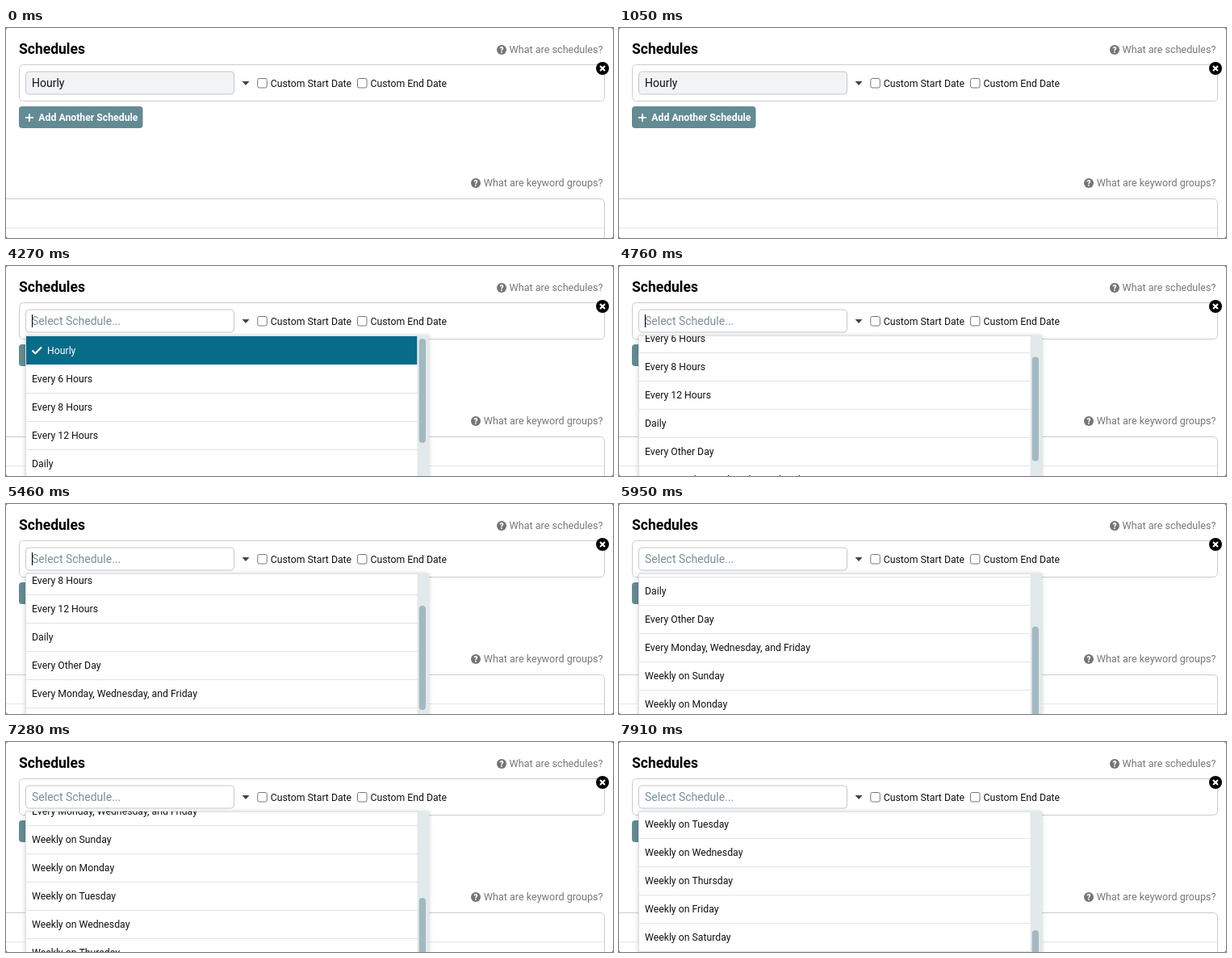
Write an HTML page with a canvas that moves like this. It is 752x260 px and loops after 8000 ms.

```html
<!DOCTYPE html>
<html lang="en">
<head>
<meta charset="utf-8">
<title>Schedule picker</title>
<style>
  html, body { margin: 0; width: 100%; height: 100%; overflow: hidden; background: #fff; }
  canvas { display: block; width: 752px; height: 260px; }
</style>
</head>
<body>
<canvas id="stage"></canvas>
<script>
const W = 752, H = 260, LOOP = 8000, TICK = 70, LAST_TICK = 7910;
const OPEN_AT = 2100, HOVER = [1820, 3010];
const ROW = 35, LIST_TOP = 87;
const ROWS = ['Hourly', 'Every 6 Hours', 'Every 8 Hours', 'Every 12 Hours', 'Daily',
  'Every Other Day', 'Every Monday, Wednesday, and Friday',
  ...['Sunday', 'Monday', 'Tuesday', 'Wednesday', 'Thursday', 'Friday', 'Saturday']
    .map(day => 'Weekly on ' + day)];

// Times at which the text caret toggles, starting visible
const BLINKS = [2590, 3220, 3780, 4270, 4830, 5390, 5880, 6440, 6930, 7490, 7910];
// Scroll gestures: start, end, from, to
const FLICKS = [
  [4270, 4970, 0, 64],
  [5280, 5880, 64, 137],
  [6230, 6930, 137, 228],
  [7250, 7910, 228, 318]
];

const canvas = document.getElementById('stage');
const ctx = canvas.getContext('2d');
const dpr = window.devicePixelRatio || 1;
canvas.width = W * dpr;
canvas.height = H * dpr;

function text(str, x, y, size, color, weight = 400) {
  ctx.font = `${weight} ${size}px Roboto, sans-serif`;
  ctx.fillStyle = color;
  ctx.fillText(str, x, y);
}

function rect(x, y, w, h, color) {
  ctx.fillStyle = color;
  ctx.fillRect(x, y, w, h);
}

function rounded(x, y, w, h, r, fill, stroke) {
  ctx.beginPath();
  ctx.roundRect(x, y, w, h, r);
  if (fill) { ctx.fillStyle = fill; ctx.fill(); }
  if (stroke) { ctx.strokeStyle = stroke; ctx.lineWidth = 1; ctx.stroke(); }
}

function disc(x, y, r, color) {
  ctx.beginPath();
  ctx.arc(x, y, r, 0, Math.PI * 2);
  ctx.fillStyle = color;
  ctx.fill();
}

function line(points, color, width) {
  ctx.beginPath();
  points.forEach(([x, y]) => ctx.lineTo(x, y));
  ctx.strokeStyle = color;
  ctx.lineWidth = width;
  ctx.stroke();
}

function help(label, x, y) {
  disc(x, y, 6, '#757575');
  ctx.textAlign = 'center';
  text('?', x, y + 3.7, 10, '#fff', 900);
  ctx.textAlign = 'right';
  text(label, 739.5, y + 4, 12.6, '#777');
  ctx.textAlign = 'left';
}

function checkbox(label, x) {
  rounded(x, 62.5, 11.5, 11.5, 2, '#fff', '#767676');
  text(label, x + 16, 72.5, 12.25, '#111');
}

function closeButton(hot) {
  disc(739, 50, 8, hot ? '#dc3c48' : '#000');
  line([[736, 47], [742, 53]], '#fff', 2.2);
  line([[742, 47], [736, 53]], '#fff', 2.2);
}

function page(open, hot, caret) {
  rect(0, 0, W, H, '#fff');
  text('Schedules', 16, 32, 17.5, '#000', 700);
  help('What are schedules?', 614, 27);
  help('What are keyword groups?', 582, 192);

  rounded(16.5, 45.5, 725, 45, 5, '#fff', '#ccc');
  rounded(24.5, 54, 258, 28, 4, open ? '#fff' : '#f1f3f5', '#c4c9cd');
  if (open) text('Select Schedule...', 32, 73, 14, '#78909a');
  else text('Hourly', 32, 73, 14, '#111');
  if (caret) rect(32, 60, 1, 16, '#000');

  ctx.beginPath();
  [[292.5, 66], [301.5, 66], [297, 71]].forEach(([x, y]) => ctx.lineTo(x, y));
  ctx.fillStyle = '#444';
  ctx.fill();
  checkbox('Custom Start Date', 311.75);
  checkbox('Custom End Date', 435.5);
  closeButton(hot);

  rounded(16, 97, 153.5, 27, 4, '#638b94');
  line([[24, 111], [34, 111]], '#fff', 2);
  line([[29, 106], [29, 116]], '#fff', 2);
  text('Add Another Schedule', 40.3, 115, 12.25, '#fff', 700);

  rounded(-20, 211.5, 761.5, 80, 5, '#fff', '#ccc');
  rect(0, 247, 741, 1, '#e6e8e9');
}

function dropdown(scroll) {
  ctx.save();
  ctx.shadowColor = 'rgba(0,0,0,.2)';
  ctx.shadowBlur = 5 * dpr;
  rect(24, 86, 500, 190, '#fff');
  ctx.restore();

  ctx.save();
  ctx.beginPath();
  ctx.rect(24, 86, 500, H);
  ctx.clip();
  rect(24, 86, 500, 1, '#dce2e4');
  rect(24, 86, 1, H, '#dce2e4');
  ROWS.forEach((label, i) => {
    const y = LIST_TOP + i * ROW - scroll;
    if (y < LIST_TOP - ROW || y > H) return;
    if (i === 0) {
      rect(25, y, 484.5, ROW, '#076b8a');
      line([[32.5, y + 17.5], [36.3, y + 21.2], [44, y + 13.5]], '#fff', 2.2);
      text(label, 51, y + 21.5, 12.25, '#fff');
    } else {
      text(label, 32, y + 22, 12.25, '#111');
      rect(25, y + ROW, 485, 1, '#e1e5e7');
    }
  });
  rect(509.5, 86, 14.5, H, '#e2e9eb');
  rounded(511.7, 90 + scroll * 0.45, 8.3, 129, 4, '#a3b9c1');
  ctx.restore();
}

function corners() {
  ctx.beginPath();
  ctx.rect(0, 0, W, H);
  ctx.roundRect(0, 0, W, H, 3);
  ctx.fillStyle = '#777';
  ctx.fill('evenodd');
}

function scrollAt(t) {
  let pos = 0;
  for (const [start, end, from, to] of FLICKS) {
    if (t < start) break;
    const p = Math.min(1, (t - start) / (end - start));
    pos = from + (to - from) * p * p * (3 - 2 * p);
  }
  return Math.round(pos);
}

function draw(t) {
  const open = t >= OPEN_AT;
  const hot = t >= HOVER[0] && t < HOVER[1];
  const caret = open && BLINKS.filter(b => t >= b).length % 2 === 0;
  ctx.setTransform(dpr, 0, 0, dpr, 0, 0);
  page(open, hot, caret);
  if (open) dropdown(scrollAt(t));
  corners();
}

function loop() {
  const t = performance.now() % LOOP;
  draw(Math.min(LAST_TICK, Math.floor(t / TICK) * TICK));
  requestAnimationFrame(loop);
}
loop();
</script>
</body>
</html>
```
